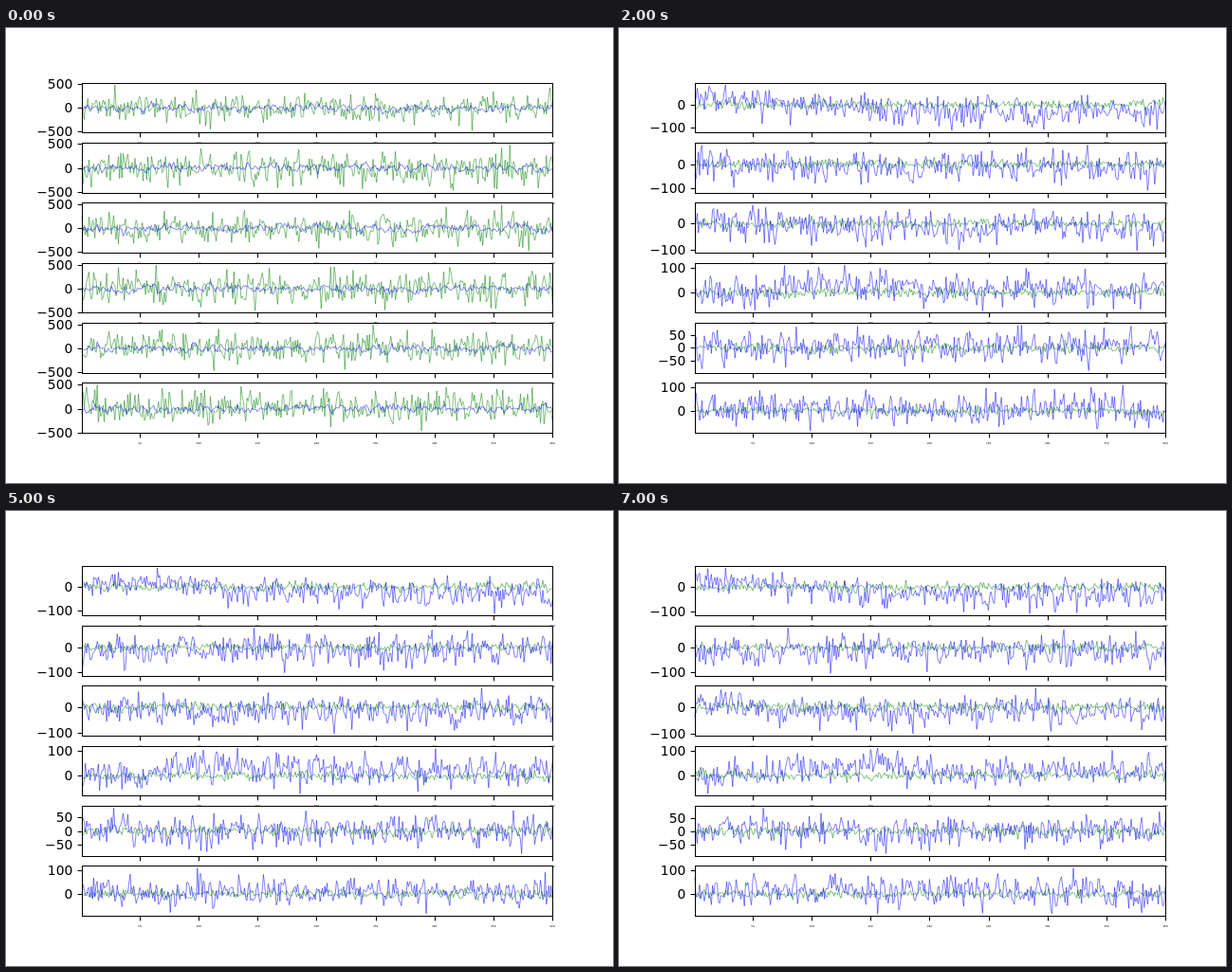
Recreate the animation shown at these times as an HTML page. Size 640 by 480 pixels, loop 8 s.

```html
<!DOCTYPE html>
<html lang="en">
<head>
<meta charset="utf-8">
<title>Six signal traces</title>
<style>
  html, body { margin: 0; width: 100%; height: 100%; overflow: hidden; background: #fff; }
  svg { display: block; }
  text { font-family: "DejaVu Sans", sans-serif; fill: #000; }
  .num { font-size: 13.89px; text-anchor: end; }
  .tiny { font-size: 2.78px; text-anchor: middle; }
  .line { fill: none; stroke-width: .5; stroke-linejoin: round; }
</style>
</head>
<body>
<svg id="stage" width="640" height="480" viewBox="0 0 640 480"></svg>
<script>
const STEP = 1000, STATES = 8, N = 400;
const LEFT = 80, WIDTH = 496, TOP = 57.6, H = 52.8, PITCH = 63.36, TICK = 4.86;

const ramp = (u, a, b) => {
  const t = Math.min(1, Math.max(0, (u - a) / (b - a)));
  return t * t * (3 - 2 * t);
};

// Usual axis limits and slow baseline of the blue trace, u running from 0 to 1
const rows = [
  { max: 92, min: -121, drift: u => 22 - 48 * ramp(u, .1, .45) },
  { max: 88, min: -114, drift: () => -10 },
  { max: 81, min: -111, drift: u => 2 - 18 * ramp(u, 0, .4) },
  { max: 120, min: -82, drift: u => u < .18 ? 3 : 20 + 20 * Math.exp(-(((u - .3) / .15) ** 2)) },
  { max: 96, min: -93, drift: () => 6 },
  { max: 117, min: -93, drift: () => 8 }
];
// The first state is dominated by a much larger green trace
const opening = { max: 530, min: -515 };

function random(seed) {
  return () => {
    seed = seed + 0x6D2B79F5 | 0;
    let t = Math.imul(seed ^ seed >>> 15, 1 | seed);
    t = t + Math.imul(t ^ t >>> 7, 61 | t) ^ t;
    return ((t ^ t >>> 14) >>> 0) / 4294967296;
  };
}

// Normal noise, each sample keeping part of the one before
function noise(rnd, sd, keep) {
  let v = 0;
  return Array.from({ length: N }, () => {
    const g = Math.sqrt(-2 * Math.log(1 - rnd())) * Math.cos(2 * Math.PI * rnd());
    v = keep * v + Math.sqrt(1 - keep * keep) * g;
    return v * sd;
  });
}

// Scale both sides of zero so that the highest and lowest samples reach hi and lo
function fit(data, hi, lo) {
  const up = hi / Math.max(...data), down = lo / Math.min(...data);
  return data.map(v => v * (v > 0 ? up : down));
}

function add(parent, tag, attrs, text) {
  const el = document.createElementNS("http://www.w3.org/2000/svg", tag);
  for (const k in attrs) el.setAttribute(k, attrs[k]);
  if (text !== undefined) el.textContent = text;
  parent.appendChild(el);
  return el;
}

const bar = (g, x, y, width, height) => add(g, "rect", { x, y, width, height });
const xAt = i => LEFT + i / (N - 1) * WIDTH;

function trace(g, data, toY, colour) {
  const points = data.map((v, i) => xAt(i).toFixed(2) + "," + toY(v).toFixed(2)).join(" ");
  add(g, "polyline", { points, class: "line", stroke: colour });
}

function ticksIn(min, max, unit) {
  const ticks = [];
  for (let v = Math.ceil(min / unit) * unit; v <= max; v += unit) ticks.push(v);
  return ticks;
}

function drawRow(g, state, row) {
  const rnd = random(state * 97 + row * 13 + 5);
  const first = state === 0;
  const top = TOP + row * PITCH, bottom = top + H;
  const y0 = Math.round(top), y1 = Math.round(bottom);

  const vary = v => v * (1 + .05 * (rnd() - .5));
  const base = first ? opening : rows[row];
  const max = vary(base.max), min = vary(base.min);
  const margin = (max - min) / 22;
  const toY = v => top + (max - v) / (max - min) * H;

  let green = noise(rnd, first ? 150 : 9.5, .1);
  let blue = noise(rnd, first ? 48 : 30, first ? .5 : .2);
  if (first) {
    green = fit(green, max - margin, min + margin);
  } else {
    blue = fit(blue.map((v, i) => v + rows[row].drift(i / N)), max - margin, min + margin);
  }

  add(g, "rect", { x: LEFT, y: top, width: WIDTH, height: H, fill: "#fff" });
  trace(g, green, toY, "#008000");
  trace(g, blue, toY, "#00f");

  for (let n = 50; n <= N; n += 50) {
    const x = xAt(n - 1);
    bar(g, Math.round(x), y1 + .5, 1, TICK);
    add(g, "text", { x, y: bottom + 11.75, class: "tiny" }, n);
  }

  // The coarsest unit that gives at least two ticks
  const ticks = [500, 100, 50].map(unit => ticksIn(min, max, unit)).find(t => t.length > 1);
  for (const v of ticks) {
    const y = Math.round(toY(v));
    bar(g, LEFT + .5 - TICK, y, TICK, 1);
    add(g, "text", { x: 70.3, y: y + 5, class: "num" }, v < 0 ? "\u2212" + -v : Math.abs(v));
  }

  for (const y of [y0, y1]) bar(g, LEFT, y, WIDTH + 1, 1);
  for (const x of [LEFT, LEFT + WIDTH]) bar(g, x, y0, 1, y1 - y0 + 1);
}

const stage = document.getElementById("stage");
const plots = Array.from({ length: STATES }, (_, state) => {
  const g = add(stage, "g", { display: "none" });
  rows.forEach((_, row) => drawRow(g, state, row));
  return g;
});

let shown = -1;
const start = performance.now();
function tick(now) {
  const state = Math.floor(Math.max(0, now - start) / STEP) % STATES;
  if (state !== shown) {
    plots.forEach((g, i) => g.setAttribute("display", i === state ? "inline" : "none"));
    shown = state;
  }
  requestAnimationFrame(tick);
}
tick(start);
</script>
</body>
</html>
```
